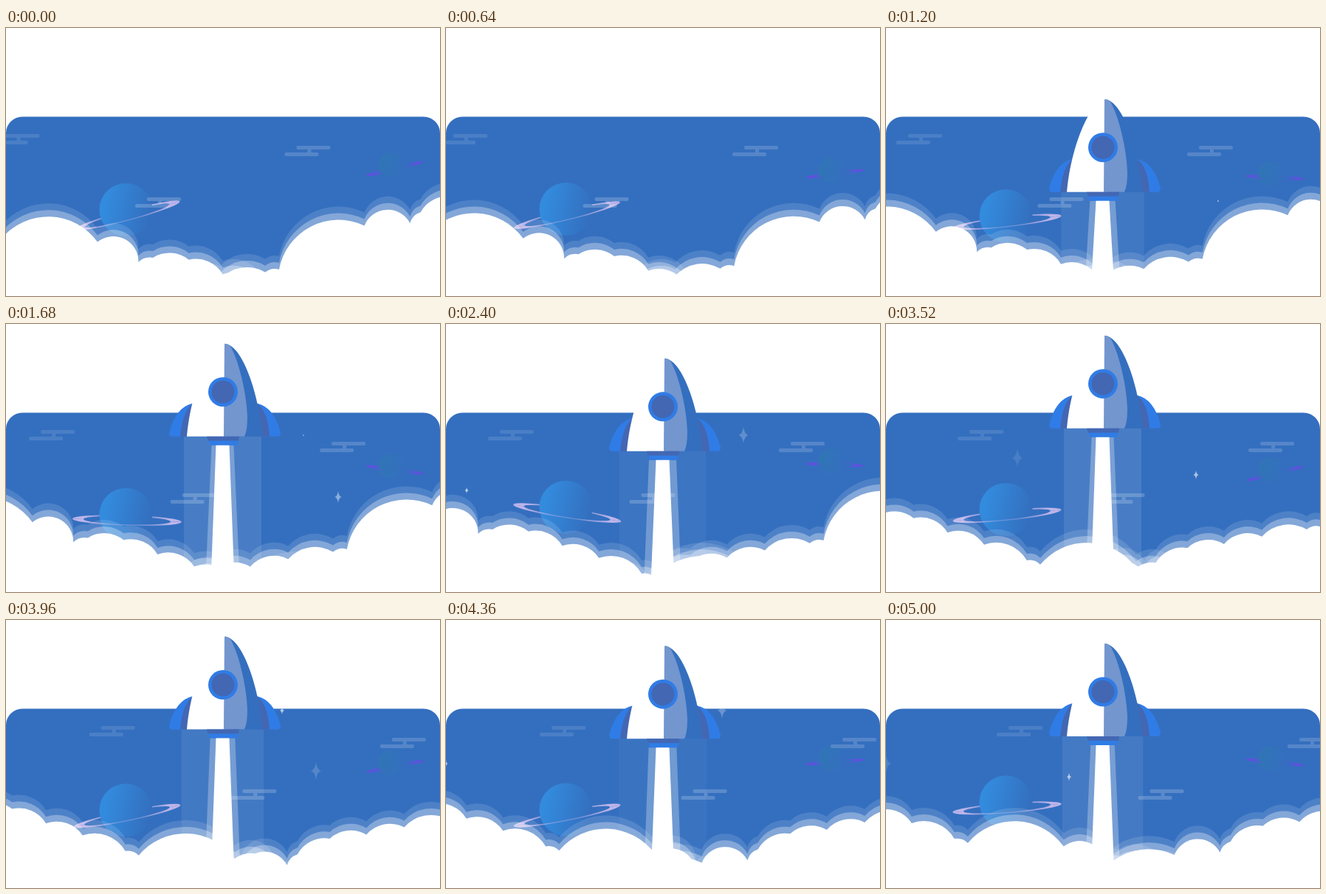
An HTML page with a canvas that plays this animation: 588 px wide and 364 px high, repeating every 5.04 s.

```html
<!DOCTYPE html>
<html lang="en">
<head>
<meta charset="utf-8">
<title>Rocket above the clouds</title>
<style>
html, body { margin: 0; width: 100%; height: 100%; overflow: hidden; background: #fff; }
canvas { display: block; }
</style>
</head>
<body>
<canvas id="stage" width="588" height="364"></canvas>
<script>
const ctx = document.getElementById('stage').getContext('2d');
const LOOP = 5.04, TAU = Math.PI * 2;
const SKY = '#346fbf', BRIGHT = '#307ce6', DARK = '#4367b3', PALE = '#7396cf';

const white = a => `rgba(255,255,255,${a})`;
const wave = (t, period) => Math.cos(TAU * t / period);
const ease = p => (1 - Math.cos(Math.PI * p)) / 2;

// Eases through [time, value] keys
function tween(keys, t) {
  if (t <= keys[0][0]) return keys[0][1];
  const i = keys.findIndex(key => t <= key[0]);
  const [t0, a] = keys[i - 1], [t1, b] = keys[i];
  return a + (b - a) * ease((t - t0) / (t1 - t0));
}

// Distance per unit of speed, after a gentle start
const travel = t => t < 0.7 ? t * t / 1.4 : t - 0.35;

function placed(x, y, degrees, paint) {
  ctx.save();
  ctx.translate(x, y);
  ctx.rotate(degrees * Math.PI / 180);
  paint();
  ctx.restore();
}

function fill(color, path) {
  ctx.fillStyle = color;
  ctx.fill(path instanceof Path2D ? path : new Path2D(path));
}

function disc(x, y, r, color) {
  ctx.fillStyle = color;
  ctx.beginPath();
  ctx.arc(x, y, r, 0, TAU);
  ctx.fill();
}

// Symmetric beam down to the bottom of the stage
function beam(color, top, halfTop, halfBottom) {
  fill(color, `M${293.5 - halfTop} ${top}h${2 * halfTop}L${293.5 + halfBottom} 364h${-2 * halfBottom}Z`);
}

// One repeat of the cloud bank: [end x, end y, radius] of each hump
const PERIOD = 435;
const humps = [[128, -23, 82], [188, -8, 34], [206, -18, 22], [254, -25.5, 42],
  [303, -16, 42], [355, -10.5, 42], [416, -2, 48], [PERIOD, 0, 20]];

const bank = (() => {
  let d = `M${-PERIOD} 0`;
  for (let k = -1; k < 2; k++)
    for (const [x, y, r] of humps) d += `A${r} ${r} 0 0 1 ${x + k * PERIOD} ${y}`;
  return new Path2D(`${d}v400H${-PERIOD}Z`);
})();

function drawBank(x, y, degrees) {
  [0.12, 0.3, 1].forEach((alpha, i) =>
    placed(x, y - 18 + 9 * i, degrees, () => fill(white(alpha), bank)));
}

// Half of a ring (side -1 back, 1 front) that fades towards its middle
function halfRing(side, rx, ry, hole, rgb, middleAlpha) {
  const shade = ctx.createLinearGradient(-rx, 0, rx, 0);
  for (const [stop, alpha] of [[0.1, 1], [0.4, middleAlpha], [0.6, middleAlpha], [0.9, 1]])
    shade.addColorStop(stop, `rgba(${rgb},${alpha})`);
  ctx.save();
  ctx.beginPath();
  ctx.rect(-rx, 0, 2 * rx, side * 2 * ry);
  ctx.clip();
  ctx.beginPath();
  ctx.ellipse(0, 0, rx, ry, 0, 0, TAU);
  ctx.ellipse(0, 0, rx * hole, ry * hole, 0, 0, TAU);
  ctx.fillStyle = shade;
  ctx.fill('evenodd');
  ctx.restore();
}

function planet(x, y, r, tint, dx, dy, tilt, ...ring) {
  const shade = ctx.createLinearGradient(x - r, y - r * 0.2, x + r, y + r * 0.2);
  shade.addColorStop(0.1, tint);
  shade.addColorStop(0.95, SKY);
  placed(x + dx, y + dy, tilt, () => halfRing(-1, ...ring));
  disc(x, y, r, shade);
  placed(x + dx, y + dy, tilt, () => halfRing(1, ...ring));
}

function wisp(x, y, alpha) {
  ctx.fillStyle = white(alpha);
  ctx.beginPath();
  ctx.roundRect(x, y, 46, 5, 2);
  ctx.roundRect(x - 16, y + 9, 46, 5, 2);
  ctx.rect(x + 15, y + 5, 5, 4);
  ctx.fill();
}

// A new star every half second
const stars = [[450, 235], [403, 151], [28, 226], [178, 182], [420, 205], [374, 123], [0, 195], [248, 213]];

function drawStar(x, y, age) {
  if (age <= 0 || age >= 1) return;
  const r = 14 * age, w = r * 0.6, k = r * 0.12;
  placed(x, y, 0, () => fill(white(1 - age),
    `M0 ${-r}Q${k} ${-k} ${w} 0Q${k} ${k} 0 ${r}Q${-k} ${k} ${-w} 0Q${-k} ${-k} 0 ${-r}Z`));
}

const bob = [[1.45, 23], [2.35, 47], [3.57, 15.5], [4.6, 38], [5.6, 21]];
const bigTilt = [[0.3, -15], [2.5, 9], [4.1, -12], [6.3, 9]];

function rocketTop(t) {
  if (t >= 1.45) return tween(bob, t);
  return 337 - 314 * ease(Math.max(0, (t - 0.55) / 0.9) ** 1.2);
}

// Tip at y = 0, base at y = 126
function rocket() {
  fill(BRIGHT, 'M253 81Q230 86 221 121Q221 126 225 126H250ZM340 81Q363 86 372 121Q372 126 368 126H340Z');
  fill(DARK, 'M253 81Q239 92 236 126H250ZM340 81Q355 92 357 126H340Z');
  fill('#fff', 'M298 0C272 5 249 75 245 126H298Z');
  fill(SKY, 'M297 0C321 3 343 70 347 126H296Z');
  fill(PALE, 'M296 0Q302 0 305 5C317 28 326 70 327 100Q327 118 323 126H295Z');
  disc(294, 65.5, 20, BRIGHT);
  disc(294, 65.5, 15.5, DARK);
  fill(DARK, 'M272 126H316L315 132H274Z');
  fill(BRIGHT, 'M274 132H315L313 138H277Z');
}

function draw(t) {
  const s = travel(t), top = rocketTop(t), launched = t > 0.6;
  ctx.clearRect(0, 0, 588, 364);
  ctx.save();
  ctx.beginPath();
  ctx.roundRect(0, 120.5, 588, 260, 22);
  ctx.clip();
  ctx.fillStyle = SKY;
  ctx.fillRect(0, 0, 588, 364);

  planet(162.5, 251.5 - 7.3 * wave(t - 0.35, 2.52), 36, '#338bdd',
    1.5, 8, tween(bigTilt, t), 74, 7, 0.8, '190,181,234', 0.4);
  planet(522, 192 - 6 * wave(t, 2.33), 17, '#3075b6',
    5, 5, -3 - 11 * wave(t, 3.55), 40, 3, 0.65, '98,78,224', 0);

  const drift = 35.8 * s;
  wisp(drift - 0.5, 144, 0.11);
  wisp(drift + 393.5, 160, 0.16);
  wisp(drift + 191, 230, 0.19);
  stars.forEach(([x, y], i) => drawStar(x, y, (t - 1.08 - i / 2) / 1.05));

  if (launched) {
    const pulse = (1 - wave(t - 1.68, 1.84)) / 2, half = 52.5 + 7 * pulse;
    beam(white(0.1 - 0.07 * pulse), top + 126, half, half);
    beam(white(0.27), top + 138, 15 + 4 * pulse, 24 + 2 * pulse);
  }
  ctx.restore();

  if (launched) placed(0, top, 0, rocket);
  drawBank(-6 - 66.3 * s, 286 - 16.1 * s, 12.2);
  drawBank(370 + 69 * s, 328 - 16.6 * s, -17.1);
  if (launched) beam('#fff', top + 138, 9, 16.5);
}

function tick() {
  draw(performance.now() / 1000 % LOOP);
  requestAnimationFrame(tick);
}
tick();
</script>
</body>
</html>
```
